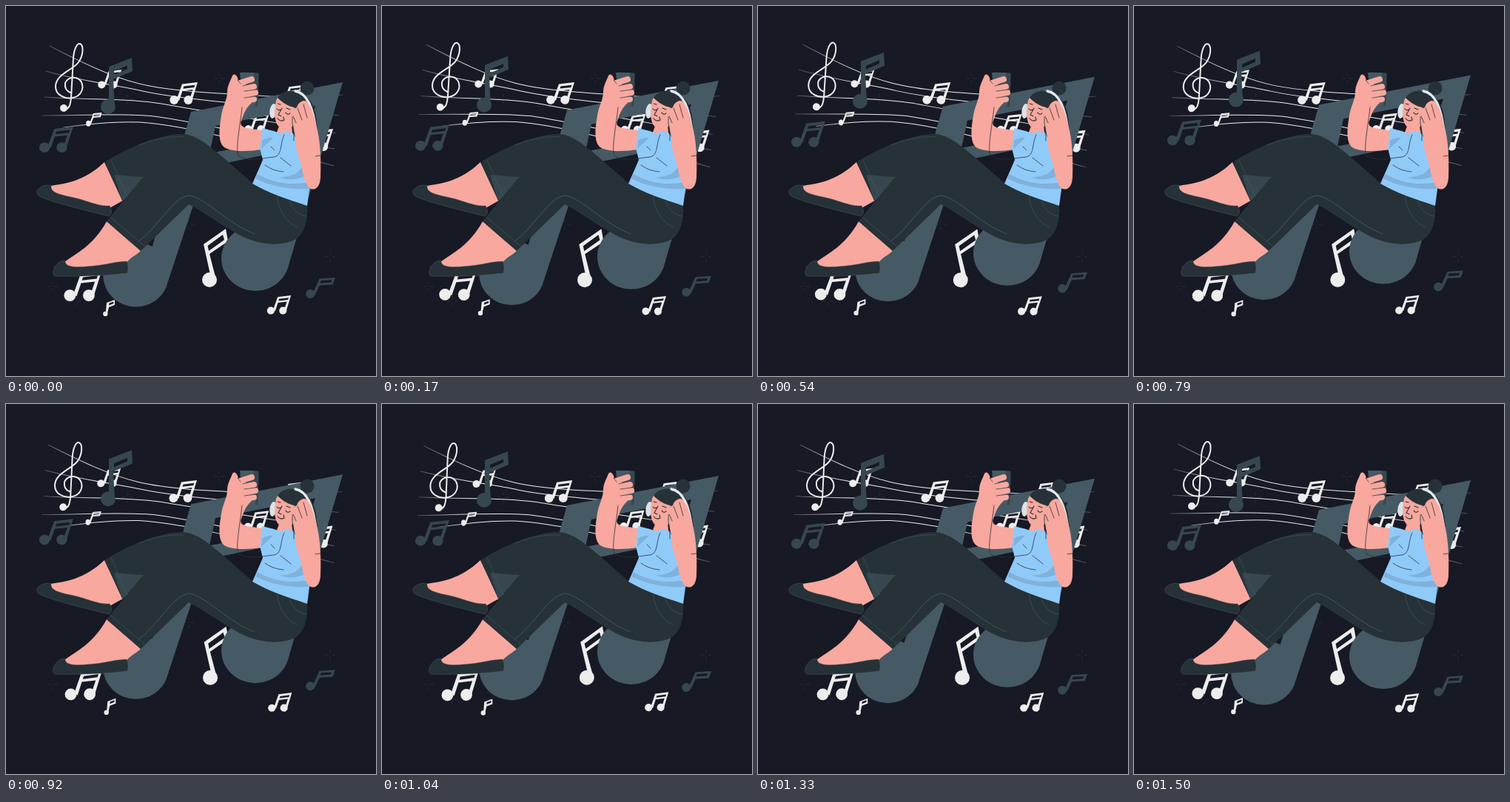
Recreate the animation shown at these times as an HTML page. Size 500 by 500 pixels, loop 1.54 s.

```html
<!DOCTYPE html>
<html lang="en">
<head>
<meta charset="utf-8">
<title>Listening to music</title>
<style>
  html, body { margin: 0; height: 100%; overflow: hidden; background: #171925; }
  svg { display: block; width: 100vw; height: 100vh; }
  .line { fill: none; stroke-linecap: round; stroke-linejoin: round; }
  .ink { stroke: #263238; }
  .seam { stroke: #455a64; stroke-width: .9; }
  .skin { fill: #f8a89e; }
  .cloth { fill: #263238; }
  .shoe { fill: #263238; stroke: #59646b; stroke-width: .4; }
</style>
</head>
<body>
<svg viewBox="0 0 500 500">
  <defs>
    <g id="pair">
      <path fill-rule="evenodd" d="M10 22 17 2.5 38 0 30.5 24 27 23 31.5 10 17.5 11.5 13 25ZM19.3 5.6 34.3 3.8 33.3 7 18.5 8.7Z"/>
      <circle cx="6.2" cy="24" r="5.9"/><circle cx="25.3" cy="24" r="5.9"/>
    </g>
    <g id="single">
      <path fill-rule="evenodd" d="M9.5 21 18.5 1.5 40 0 36.5 9.5 18.8 10.5 12.5 24ZM20.5 4 35.2 3.2 34 6.4 19.5 7.4Z"/>
      <circle cx="6.2" cy="22" r="6"/>
    </g>
    <path id="spark" d="M-7 0h4m6 0h4M0-7v4m0 6v4"/>
    <linearGradient id="fade" gradientUnits="userSpaceOnUse" x1="50" x2="455" y1="0" y2="0">
      <stop stop-color="#ededed" stop-opacity=".2"/><stop offset=".18" stop-color="#ededed"/>
      <stop offset=".7" stop-color="#ededed"/><stop offset="1" stop-color="#ededed" stop-opacity=".2"/>
    </linearGradient>
  </defs>

  <g class="line" stroke="#29303a" stroke-width=".9">
    <use href="#spark" x="288" y="98"/><use href="#spark" x="63" y="379"/>
    <use href="#spark" x="247" y="295"/><use href="#spark" x="438" y="339"/>
    <use href="#spark" x="164" y="126"/><use href="#spark" x="95" y="399"/>
  </g>

  <g id="sway" fill="#ededed">
    <g class="line" stroke="url(#fade)">
      <path d="M59 54C100 75 140 95 180 105 225 116 290 118 340 121 380 124 420 124 455 120"/>
      <path d="M54 88C100 101 150 107 185 115 235 126 310 130 450 148"/>
      <path d="M52 123C100 127 160 124 210 132 270 143 360 156 446 172"/>
      <path d="M49 148C100 148 160 145 200 149 260 157 350 180 444 193"/>
      <path d="M78 164C110 160 140 156 180 157 245 161 340 188 443 216"/>
    </g>
    <path class="line" stroke="#ededed" stroke-width="2" d="M79 140C86 139 87 133 88 124L91 70C92 58 96 50 100 51 105 53 105 66 98 76 90 87 67 92 67 109 67 120 79 126 90 124 101 122 106 112 102 103 97 94 84 95 80 104 79 111 82 115 87 117"/>
    <circle cx="78" cy="138" r="5"/>
    <use href="#pair" transform="translate(221 103)"/>
    <use href="#pair" transform="translate(124 86)scale(.85)"/>
    <use href="#pair" transform="translate(78 359)scale(1.34)"/>
    <use href="#pair" transform="translate(352.5 391)scale(.86)"/>
    <use href="#pair" transform="translate(322 145)scale(.89)"/>
    <use href="#pair" transform="translate(368 107)scale(.85)"/>
    <use href="#pair" transform="translate(404 166)"/>
    <use href="#single" transform="translate(108 144)scale(.54 .67)"/>
    <path fill-rule="evenodd" d="M136 401 147 397V404L139 407 136.5 417H134.5ZM139.5 401.5 145.3 399.5V402L139 404.5Z"/>
    <circle cx="134.3" cy="416" r="3.2"/>
    <path fill-rule="evenodd" d="M267 322 297 301 300 318 275 335 284 370 278 372ZM272.5 324 293 309 295 316 274 331Z"/>
    <circle cx="275" cy="370" r="10"/>
  </g>

  <g id="float" fill="#37474f">
    <use href="#pair" transform="translate(44.5 163)scale(1.22 1.17)"/>
    <use href="#single" transform="translate(405 367)"/>
    <path fill-rule="evenodd" d="M139 82 170 70 171 88 145 99 147 137 139 137ZM146 88 164 80.5V85L146 93Z"/>
    <circle cx="138" cy="136" r="10"/>
    <g fill="#455a64">
      <path fill-rule="evenodd" d="M250 143 455 103 382 350 330 330 374 196 270 218 219 372 192 345ZM283 162 418 135 405 174 275 199Z"/>
      <ellipse cx="175.5" cy="363" rx="44.5" ry="43.5"/>
      <ellipse cx="337" cy="341" rx="46" ry="44"/>
    </g>
  </g>

  <!-- legs -->
  <path class="skin" d="M60 243C80 240 106 237 133 211L158 263 140 273C110 267 75 260 60 249Z"/>
  <path class="shoe" d="M42 249C48 242 56 241 61 243 60 253 75 255 92 259 110 263 125 271 140 270 144 276 143 282 139 284 110 277 60 265 45 257 41 254 41 251 42 249Z"/>
  <path class="cloth" d="M133 211C165 191 210 172 240 173 265 175 290 203 334 240L300 290 205 236 157 263Z"/>
  <path fill="#37474f" d="M146 228 195 232 205 240 157 263Z"/>
  <path class="skin" d="M79 346C95 334 118 324 136 291L182 331C174 338 166 341 160 350L85 357Z"/>
  <path class="shoe" d="M64 357C67 348 75 343 80 344 79 355 100 353 120 351 138 349 150 345 163 345 166 350 165 357 164 361 130 365 90 366 66 365 63 363 63 360 64 357Z"/>
  <path class="cloth" d="M136 291C160 262 188 226 210 206 222 194 236 189 250 191 280 196 310 224 334 240 360 251 385 261 407 270 408 292 403 307 392 315 375 324 350 324 325 314 300 303 275 283 247 268L182 331Z"/>
  <g class="line seam">
    <path d="M179 318C205 300 225 259 247 256 270 259 300 295 336 308"/>
    <path d="M142 286 188 325M142 208 164 258" opacity=".6"/>
    <path d="M367 258C368 275 377 291 394 299M383 264C388 276 396 283 406 284M180 188C205 178 225 176 240 177" opacity=".7"/>
  </g>

  <!-- phone arm -->
  <rect x="317" y="90" width="24" height="46" rx="3" fill="#37474f" transform="rotate(2 329 113)"/>
  <path fill="#455a64" d="M316 90H335L337 136H321Z"/>
  <path class="skin" d="M306 94C309 90 313 94 314 101L323 104 332 131C322 140 321 148 318 155 316 160 318 163 325 165L346 168V194C325 197 304 197 295 191 286 184 288 165 291 148 293 135 299 127 299 116 299 107 304 100 306 94Z"/>
  <g class="line">
    <path stroke="#f8a89e" stroke-width="8" d="M316 104 332 99M318 112 335 109M318 120 337 117M318 128 335 126"/>
    <path class="ink" stroke-width=".7" d="M320 108 336 104M322 115 338 113M322 124 338 122M313 100 317 105"/>
  </g>

  <!-- hair, head and body -->
  <path class="cloth" d="M383 116C405 112 419 132 420 158L424 202 400 208 386 160Z"/>
  <circle class="cloth" cx="407" cy="111" r="9.5"/>
  <ellipse cx="361" cy="142" rx="4.6" ry="10" fill="#dce2e6" transform="rotate(8 361 142)"/>
  <path class="skin" d="M370 160 386 160 388 182 363 178Z"/>
  <path fill="#90caf9" d="M346 165 362 169 370 172 381 169 388 172 397 188C398 205 401 225 411 240L407 270C380 261 353 252 333 240L347 208 343 192Z"/>
  <path fill="#7fb2db" d="M340 227C360 239 385 243 409 238L409 247C385 249 355 243 337 233ZM370 232C388 230 398 225 401 214L406 229C395 235 382 236 370 232ZM346 182C350 179 356 177 361 178L345 193Z"/>
  <path class="skin" d="M365 128C368 119 377 118 388 125L395 150C391 162 383 167 374 166 363 163 361 147 365 128Z"/>
  <path class="cloth" d="M367 124C371 117 381 113 390 115 400 119 406 132 405 145L396 152C396 144 393 139 389 137 380 135 373 130 367 124Z"/>
  <path class="line" stroke="#e4e8eb" stroke-width="3.4" d="M391 115C403 117 415 130 419 172"/>
  <g class="line ink" stroke-width="1.1">
    <path d="M366 139Q368 142 371 140M378 144Q380 148 384 145M367 132 371 133M379 138 384 140"/>
    <path d="M373 138 368 147 372 149M367 152Q371 157 376 154M375 150 376 154"/>
    <path stroke-width=".8" d="M319 137C316 165 309 198 315 203 328 211 350 205 362 204 374 202 370 185 376 174"/>
    <path stroke-width=".8" d="M350 215C360 222 367 223 375 224M371 205 385 216M358 190 363 195"/>
  </g>

  <!-- raised arm -->
  <path class="skin" d="M387 150C386 143 390 138 393 137 395 130 402 126 406 129 413 136 416 149 419 160 424 178 426 200 425 232 424 247 416 250 410 246 403 239 401 225 398 211 393 198 391 188 391 178 389 168 387 158 387 150Z"/>
  <g class="line ink" stroke-width=".8">
    <path d="M394 138 400 154M402 133 407 151M388 149 392 158M387 150C386 162 390 170 389 182M418 203 425 202"/>
  </g>
</svg>
<script>
  const LOOP = 1540, FRAME = 1000 / 24, CYCLE = 36;
  const sway = document.getElementById('sway');
  const float = document.getElementById('float');

  // Triangle wave: 0 at p=0, 1 at p=.25, -1 at p=.75
  const triangle = p => 1 - 4 * Math.abs((p + .25) % 1 - .5);

  function draw(now) {
    const step = Math.floor((now % LOOP + 5) / FRAME);
    const p = step / CYCLE % 1;
    sway.setAttribute('transform', `rotate(${triangle(p)} 250 237)`);
    float.setAttribute('transform', `translate(0 ${-10 * (1 - Math.abs(2 * p - 1))})`);
    requestAnimationFrame(draw);
  }
  draw(performance.now());
</script>
</body>
</html>
```
